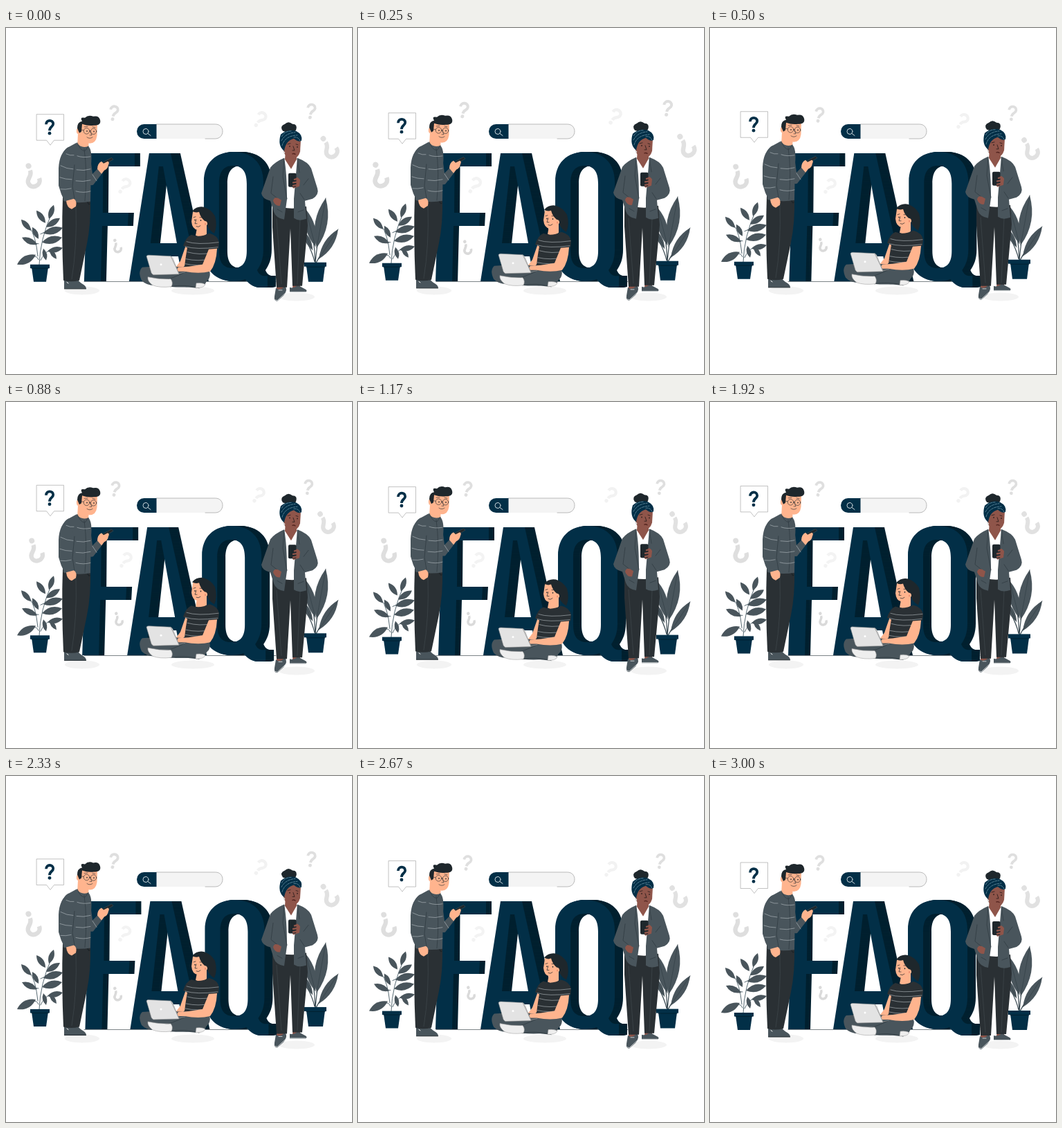
Write an HTML page that moves like this. It is 500 by 500 pixels and loops after 3.04 s.

```html
<!DOCTYPE html>
<html lang="en">
<head>
<meta charset="utf-8">
<title>FAQ</title>
<style>
  html, body { margin: 0; width: 100%; height: 100%; overflow: hidden; background: #fff; }
  svg { display: block; width: 100vw; height: 100vh; }
  .line { fill: none; stroke-linecap: round; stroke-linejoin: round; }
  .navy { fill: #022f47; }
  .side { fill: #01202f; }
  .slate { fill: #49555c; }
  .black { fill: #2a3034; }
  .ink { fill: #1e272c; }
  .skin { fill: #ffb48e; }
  .brown { fill: #8f554a; }
  .shadow { fill: #f3f3f3; }
  .thin { stroke: #263238; stroke-width: .6; }
  .stripe { stroke: #c3cacd; stroke-width: .55; }
</style>
</head>
<body>
<svg viewBox="0 0 500 500">
  <defs>
    <g id="ask">
      <path class="line" style="stroke-linecap:butt" stroke="currentColor" stroke-width="3.8"
        d="M-5-4.6C-5-11.6 5.2-11.6 5.2-5.2C5.2-.8 0-1.4 0 4.4"/>
      <circle cy="8.4" r="2.4" fill="currentColor"/>
    </g>
    <path id="F" d="M119 181H186V200H140.500L140 267H177L176 286H139L137 366H113Z"/>
    <path id="A" fill-rule="evenodd" d="M207 181H238L279 366H256L249 330H209L203 366H178ZM221 200L209 311H247L227 200Z"/>
    <path id="Q" fill-rule="evenodd" d="M286 222C286 195 303 179 329 179S372 195 372 222V320C372 334 368 343 363 350C366 357 370 359 378 358V374C364 377 354 374 346 363C341 365 335 366 329 366C303 366 286 350 286 320ZM308 225V322C308 340 315 347 328 347S348 340 348 322V225C348 207 341 199 328 199S308 207 308 225Z"/>
  </defs>

  <ellipse class="shadow" cx="110" cy="379.500" rx="25" ry="6"/>
  <ellipse class="shadow" cx="270" cy="379.500" rx="31" ry="6"/>
  <ellipse class="shadow" cx="420" cy="388.500" rx="26" ry="6"/>
  <path class="line thin" d="M113 366.500H390"/>

  <g id="marks"></g>

  <g id="search">
    <rect x="189" y="139" width="124" height="21" rx="10.500" fill="#f4f4f4"/>
    <path class="line" stroke="#8d8d8d" stroke-width=".6" d="M217 139H302.500C316.500 139 316.500 159.500 302.500 160H288"/>
    <path class="navy" d="M199.500 139H217.500V160H199.500A10.500 10.500 0 0 1 199.500 139Z"/>
    <path class="line" stroke="#fff" stroke-width=".8" d="M205 152.500L209 155.500M206 149.500A4 4 0 1 1 198 149.500A4 4 0 1 1 206 149.500"/>
  </g>

  <g id="faq"></g>

  <g class="bob">
    <path class="line" fill="#fff" stroke="#999" stroke-width=".6" d="M44.500 125H83.500V162.500H69.500L64 169.500L58.500 162.500H44.500Z"/>
    <use href="#ask" color="#022f47" x="63" y="144"/>
  </g>

  <g class="bob">
    <path class="line" stroke="#455a64" stroke-width=".9" d="M48 342Q49 306 66 268M46 330Q43 300 34 288M50 336Q55 324 66 320M47 335Q44 328 38 331M50 298Q56 296 60 292M47 312Q38 312 34 307"/>
    <g id="leaves" class="slate"></g>
    <path class="navy" d="M37 346H61L58 367H40Z"/>
    <rect class="navy" x="35" y="342" width="28" height="5.500"/>
    <path class="line" stroke="#011a28" stroke-width=".7" d="M37 347.500H61"/>
  </g>

  <g class="bob">
    <path class="line" stroke="#37474f" stroke-width="1.200" d="M447 341Q449 315 456 275M447 340Q446 305 437 278M448 340Q455 326 465 315M446 338Q443 325 435 310"/>
    <g id="blades" class="slate"></g>
    <path class="navy" d="M434 344H461L458 367H437Z"/>
    <rect class="navy" x="431" y="339" width="32" height="6"/>
    <path class="line" stroke="#011a28" stroke-width=".7" d="M434 345.500H461"/>
  </g>

  <!-- man with phone -->
  <g class="drift">
    <path class="slate" d="M84 364H104C107 370 116 371 116 377H84Z"/>
    <path class="line" stroke="#1e272c" stroke-width="1" d="M84.500 377H115.500"/>
    <path class="line" stroke="#fff" stroke-width="1" d="M88 367.500L90 369"/>
    <path class="black" d="M82 245H122Q123 283 117 312L106 365Q94 368 83 365Q80 300 82 245Z"/>
    <path class="line" stroke="#40484d" stroke-width=".7" d="M101 258Q103 315 95 363"/>
    <path class="line" stroke="#1d2327" stroke-width="1.200" d="M117 250Q120 257 121 254"/>
    <path class="slate" d="M112 183L121 180L125 211L134 202L140 209L126 227Q117 229 113 218Z"/>
    <path class="ink" stroke="#4a5459" stroke-width=".5" d="M138.500 195L152.500 187.500L155 190L141 198.500Z"/>
    <path class="skin" d="M132 204Q132 196 138 193L141 196L147 193Q150 194 148 198Q147 204 142 206L138 211Z"/>
    <path class="skin" d="M104 153L103 171Q111 181 119 174L120 160Z"/>
    <path class="slate" d="M102 166Q109 175 119 171Q125 177 123 198L122 251Q104 254 83 250L79 200Q80 176 91 172Z"/>
    <path class="slate" d="M91 172Q77 180 76 203L76 228Q79 240 85 251L99 248L96 229L99 200Z"/>
    <path class="skin" d="M87 250L98 247Q103 250 101 258L95 262Q88 260 87 250Z"/>
    <path class="line" stroke="#343f46" stroke-width=".9" d="M99 198L96 229L99 247M113 175Q118 210 114 250M103 166Q107 177 114 178L119 171"/>
    <path class="line stripe" d="M87 182Q93 185 98 184M103 185Q111 188 122 186M79 199Q88 204 97 204M102 205Q112 207 122 204M78 216Q86 219 95 219M101 221Q111 223 122 220M79 233Q86 234 94 232M101 236Q112 239 122 236M125 212L131 221"/>
    <path class="skin" d="M106 140Q120 132 132 140L131.500 156Q130 167 121 167Q109 165 106 154Q101 154 102 147Q104 142 107 146Z"/>
    <path class="ink" d="M106 152L103 145Q103 136 110 135Q106 128 114 130Q119 125 126 128Q134 126 136 133Q138 141 127 141Q118 142 110 139L109 150Z"/>
    <g class="line" stroke="#1e272c" stroke-width=".6">
      <circle cx="116.500" cy="149" r="4.300"/><circle cx="126.500" cy="149.500" r="4.200"/>
      <path d="M107 147L112 148M121 149H122.500M113 143L118 142.500M125 143L129 144M122 150L124 155L121 155M117 158Q121 161 125 158"/>
    </g>
    <path class="line" stroke="#1e272c" stroke-width="1.500" d="M117 149V149.500M127 149.500V150"/>
  </g>

  <!-- seated woman with laptop -->
  <g class="bob">
    <path class="skin" d="M277 284L274 300Q282 305 290 298L290 278Z"/>
    <path class="skin" d="M260 314L252 337L243 349L250 352L262 340L268 314Z"/>
    <path class="slate" d="M258 346Q228 343 197 346Q190 352 196 365Q205 375 225 371L276 376Q293 374 290 355Q288 347 276 345Z"/>
    <path class="slate" d="M285 343Q299 351 293 363Q282 378 236 374L228 365Q255 352 285 343Z"/>
    <path class="line" stroke="#343f46" stroke-width=".9" d="M215 369Q243 362 263 351M238 374Q257 370 279 376"/>
    <path fill="#eee" stroke="#a4a4a4" stroke-width=".6" d="M205 360Q222 364 238 363Q242 368 239 374Q222 376 212 372Q204 366 205 360ZM275 369Q284 368 288 371Q286 376 274 376Z"/>
    <path class="black" d="M268 299Q279 304 294 297Q306 300 308 310L307 319L300 321L295 346Q276 350 258 345Q260 328 262 318L256 315Q260 302 268 299Z"/>
    <path class="line stripe" d="M261 309Q276 314 307 310M259 316Q275 321 306 317M262 324Q280 329 298 325M260 334Q278 338 296 334M259 341Q276 345 294 341"/>
    <path class="skin" d="M293 320L305 319Q304 341 295 352Q279 356 258 352L245 352L249 346L264 345L284 342Z"/>
    <path d="M203 330Q204 328 207 328.500L238 330Q240 331 241 333L250 356L213 357Q211 356 210 354Z" fill="#e3e3e3" stroke="#929292" stroke-width=".6"/>
    <path class="line" stroke="#929292" stroke-width=".8" d="M238 330L250 355L259 353"/>
    <circle cx="224" cy="342" r="1.500" fill="#fff"/>
    <path class="skin" d="M270 266Q282 259 292 271L291 284Q286 293 277 292Q269 291 268 280Z"/>
    <path class="ink" d="M269 265Q276 257 286 259Q296 262 302 272Q306 286 301 297Q294 293 291 286Q292 279 287 279Q281 274 279 266Q274 268 269 265Z"/>
    <path class="line" stroke="#1e272c" stroke-width=".7" d="M271 274L274 273M280 274L283 274M275 277L273 283L276 283M275 287Q278 289 281 286"/>
    <path class="line" stroke="#1e272c" stroke-width="1.500" d="M273 277.500V278M281.500 278V278.500"/>
    <path class="line" stroke="#ef8d70" stroke-width="1.800" d="M288 283L288 284"/>
  </g>

  <!-- standing woman with phone -->
  <g class="drift">
    <path class="brown" d="M391 368H403V382H391ZM415 367H425V376H414Z"/>
    <path class="slate" d="M390 376Q396 381 403 373Q408 379 401 387L392 395Q387 395 388 388ZM410 375Q415 377 422 372L433 378Q436 380 433 382H410Z"/>
    <path class="line" stroke="#fff" stroke-width=".7" d="M389 393L392 394L405 382M410 381.500H433M394 379L399 379"/>
    <path class="black" d="M385 255Q409 265 434 258L436 286L428 373H414L411 290L406 375H391L385 288Z"/>
    <path class="line" stroke="#40484d" stroke-width=".7" d="M425 276L421 370M391 276L398 370"/>
    <path fill="#fff" d="M402 190H420L418 249H404Z"/>
    <path class="brown" d="M404 178H420V190L412 204L403 190Z"/>
    <path class="slate" d="M402 188Q406 210 406 248L402 277Q390 275 387 266L382 250Q370 247 369 239L382 202Q388 194 402 188Z"/>
    <path class="slate" d="M421 188Q437 194 441 203L450 232Q453 241 443 247L432 250L434 276Q423 280 416 275L416 247Z"/>
    <path class="line" stroke="#343f46" stroke-width=".9" d="M386 215L383 239L393 247M437 218L430 227M431 248L425 239M402 189L400 215L406 247M421 189L424 209M392 262L399 266M422 266L430 263"/>
    <path class="brown" d="M386 250Q387 244 393 246L398 249L396 257Q389 258 386 250ZM413 218Q421 213 425 220L424 229L415 232Q411 226 413 218Z"/>
    <rect class="ink" x="408" y="210" width="11.500" height="20" rx="2"/>
    <path class="line" stroke="#8f554a" stroke-width="2.400" d="M421 218L417 219M421 222.500L415 223.500M420 227L415 228"/>
    <path class="ink" d="M400 149Q395 142 403 139Q408 134 414 139Q422 139 419 148L412 153Z"/>
    <path class="brown" d="M401 164Q413 154 426 162L425 179Q422 190 412 189Q402 187 401 176Z"/>
    <path class="navy" d="M402 178Q392 170 397 154Q407 145 419 149Q429 154 427 163Q423 166 416 160Q404 163 402 178Z"/>
    <path class="line" stroke="#7fa3b4" stroke-width=".7" stroke-dasharray="3 1.500" d="M398 163Q404 152 418 151M399 170Q403 156 421 155M412 149Q402 149 398 158M416 158Q422 157 425 163"/>
    <path class="line" stroke="#281b1a" stroke-width=".8" d="M407 168L411 167M419 168L422 169M415 171L417 177L414 177"/>
    <path class="line" stroke="#281b1a" stroke-width="1.500" d="M410 171V171.500M421 172V172.500"/>
    <path class="line" stroke="#54241f" stroke-width="1.400" d="M414 182Q416 181 418 182.500"/>
    <circle cx="402" cy="180" r="1.200" fill="#d9d9d9"/>
  </g>
</svg>
<script>
const $ = id => document.getElementById(id);

// x, y, rotation, size, colour
const marks = [
  [157.5, 126, 10, 1, "#dfdfdf"], [436.5, 123.5, 8, 1, "#dfdfdf"],
  [364, 135, 33, 1.1, "#f2f2f2"], [172, 229, 33, 1.1, "#f3f3f3"],
  [461.5, 173, 146, 1.6, "#e1e1e1"], [42, 213.5, 160, 1.65, "#dedede"],
  [162, 313, 160, .93, "#dadada"]
];
$("marks").innerHTML = marks.map(([x, y, turn, size, color]) =>
  `<use href="#ask" color="${color}" transform="translate(${x} ${y}) rotate(${turn}) scale(${size})"/>`).join("");

// Letters pulled out to the right by their depth
$("faq").innerHTML = [["F", 8], ["A", 14], ["Q", 12]].map(([id, depth]) => {
  let out = "";
  for (let x = depth; x > 0; x--) out += `<use href="#${id}" class="side" x="${x}"/>`;
  return out + `<use href="#${id}" class="navy"/>`;
}).join("");

// A leaf runs from base (x, y) to tip (u, v)
const leaf = (width, vein) => ([x, y, u, v]) => {
  const dx = u - x, dy = v - y, nx = -dy * width, ny = dx * width;
  const mx = x + dx * .5, my = y + dy * .5;
  return `<path d="M${x} ${y}Q${mx + nx} ${my + ny} ${u} ${v}Q${mx - nx} ${my - ny} ${x} ${y}"/>` +
    (vein ? `<path class="line" stroke="#303d44" stroke-width=".6" d="M${x} ${y}L${u} ${v}"/>` : "");
};
$("leaves").innerHTML = [
  [62, 276, 69, 256], [57, 282, 44, 264], [58, 288, 78, 275], [36, 293, 22, 277],
  [54, 297, 82, 289], [47, 305, 38, 288], [45, 313, 23, 303], [52, 310, 81, 303],
  [43, 328, 16, 342], [60, 323, 82, 318], [58, 336, 54, 319], [63, 320, 73, 334]
].map(leaf(.36)).join("");
$("blades").innerHTML = [
  [449, 318, 462, 246], [447, 316, 433, 262], [452, 334, 480, 291], [443, 321, 429, 293]
].map(leaf(.24, true)).join("");

// Linear keyframes: flat list of position, value
function track(p, keys) {
  let i = 0;
  while (i < keys.length - 4 && p > keys[i + 2]) i += 2;
  const [p0, v0, p1, v1] = keys.slice(i, i + 4);
  return v0 + (v1 - v0) * (p - p0) / (p1 - p0);
}
const beat = [0, 1, .1, 1.1, .3, 1, .4, 1, .5, 1.1, .6, 1, 1, 1];
const shake = [0, 0, .1, -1, .2, 2, .3, -3, .4, 3, .5, -3, .6, 3, .7, -3, .8, 2, .9, -1, 1, 0];
const rise = [0, 0, .5, -6, 1, 0];

const LOOP = 3040, LEAD = 33;
const bobs = document.querySelectorAll(".bob"), drifts = document.querySelectorAll(".drift");
const lift = (nodes, y) => nodes.forEach(n => n.setAttribute("transform", `translate(0 ${y})`));

function draw(time) {
  const step = Math.floor((time % LOOP + 5) * 24 / 1000);
  const slow = Math.min(step / 24 * 1000 + LEAD, 3000) / 3000;
  const fast = slow === 1 ? 1 : slow * 2 % 1;
  const size = track(fast, beat);
  $("marks").setAttribute("transform", `translate(250 250) scale(${size}) translate(-250 -250)`);
  $("faq").setAttribute("transform", `translate(${track(slow, shake)} 0)`);
  lift(bobs, track(fast, rise));
  lift(drifts, track(slow, rise));
}

const start = performance.now();
function tick() {
  draw(performance.now() - start);
  requestAnimationFrame(tick);
}
tick();
</script>
</body>
</html>
```
